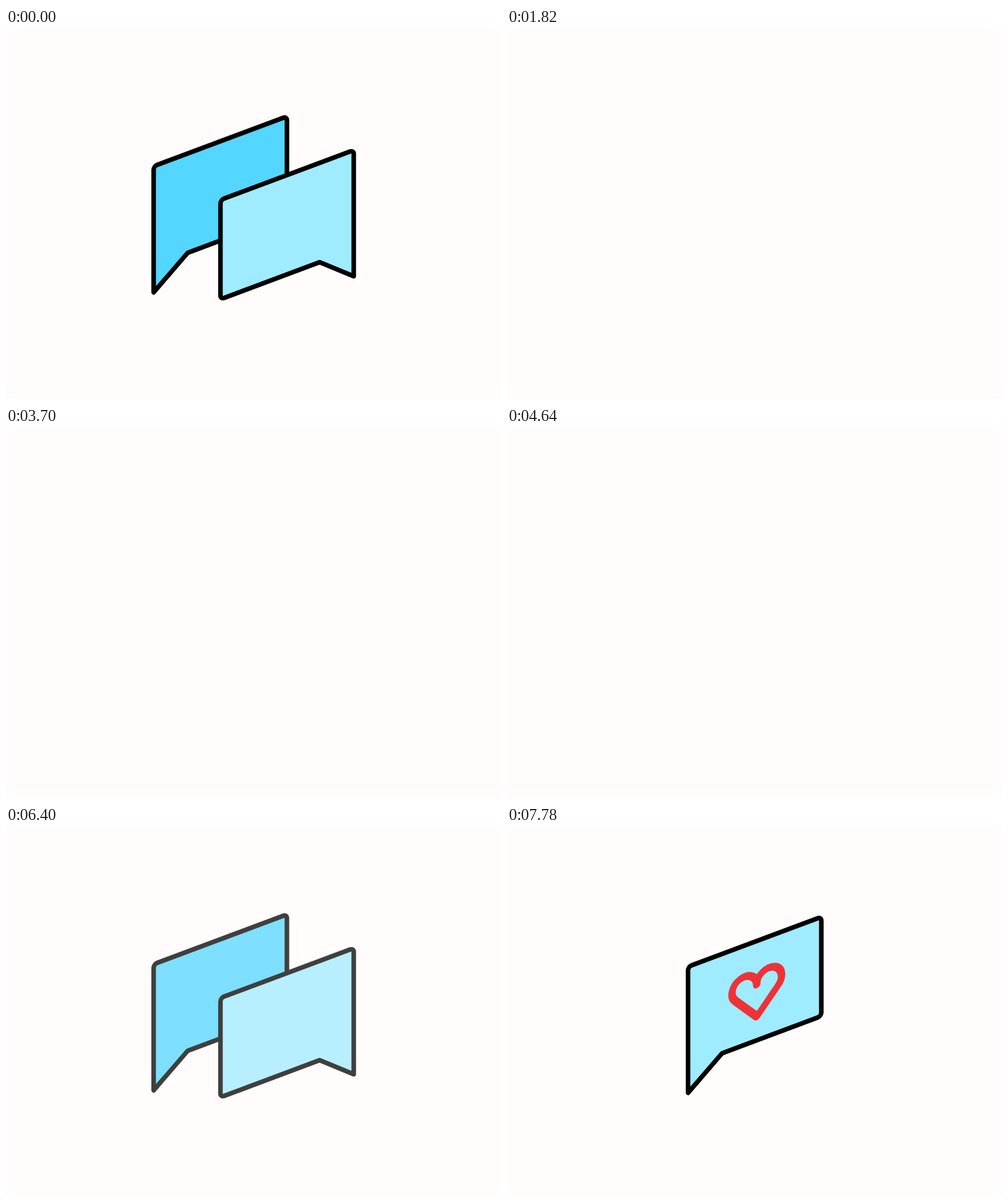
An HTML page that plays this animation: 800x600 px, repeating every 8 s.

```html
<!DOCTYPE html>
<html lang="en">
<head>
<meta charset="utf-8">
<title>Chat bubbles</title>
<style>
  html, body { margin: 0; width: 100%; height: 100%; overflow: hidden; background: #fffcfb; }
  svg { display: block; width: 100vw; height: 100vh; stroke-linejoin: round; }
  .bubble { stroke: #000; stroke-width: 7.4; }
  .deep { fill: #53d6ff; }
  .pale { fill: #9febff; }
  .icon { fill: none; stroke-width: 12; }
  #play { stroke: #f4433c; }
  #heart { stroke: #ee3338; }
</style>
</head>
<body>
<svg viewBox="0 0 800 600">
  <defs>
    <!-- Upright bubble, origin at the middle of its top edge -->
    <path id="bubble" vector-effect="non-scaling-stroke"
      d="M-107.7 6 a6 6 0 0 1 6 -6 H101.7 a6 6 0 0 1 6 6 V154.6 a6 6 0 0 1 -6 6 H-52.5 L-107.7 204 Z"/>
  </defs>

  <g id="pair">
    <g transform="translate(346.3 183.2) skewY(-20.5)">
      <use href="#bubble" class="bubble deep"/>
    </g>
    <g transform="translate(454.3 237.8) skewY(-20.5)">
      <use href="#bubble" class="bubble pale" transform="scale(-1 1)"/>
      <path id="play" class="icon" transform="translate(-26.1 84.6)" d="M0 -32 L61.5 0 L0 32 Z"/>
    </g>
  </g>

  <g id="single" transform="translate(400.3 187.2) skewY(-20.5)">
    <use href="#bubble" class="bubble pale"/>
    <path id="heart" class="icon" transform="translate(3.4 70.5)"
      d="M0 0 A20 20 0 1 0 -34 14.3 L0 51.6 L34 14.3 A20 20 0 1 0 0 0 Z"/>
  </g>
</svg>

<script>
  const LOOP = 8000, STEP = 40;
  const FIRST = 1080, PERIOD = 940, HOLD = 620;
  const INTRO_END = 1820, HEART_START = 7660, PLAY_ROUND = 6;

  const pair = document.getElementById('pair');
  const play = document.getElementById('play');
  const single = document.getElementById('single');

  // Rises from 0 to 1 in equal jumps, the first one at `start`
  const ramp = (t, start, jumps) =>
    Math.min(1, Math.max(0, (Math.floor((t - start) / STEP) + 1) / jumps));

  function pairOpacity(t) {
    if (t < INTRO_END) return 1 - ramp(t, 1000, 2) + ramp(t, 1120, 2) - ramp(t, 1660, 5);
    if (t >= HEART_START) return 0;
    const u = (t - FIRST) % PERIOD;
    return ramp(u, 0, 4) - ramp(u, HOLD, 4);
  }

  function draw(now) {
    const t = now % LOOP;
    const round = Math.floor((t - FIRST) / PERIOD);
    pair.style.opacity = pairOpacity(t);
    play.style.opacity = round === PLAY_ROUND ? 1 : 0;
    single.style.opacity = ramp(t, HEART_START, 4);
  }

  const begin = performance.now();
  function tick() {
    draw(performance.now() - begin);
    requestAnimationFrame(tick);
  }
  tick();
</script>
</body>
</html>
```
